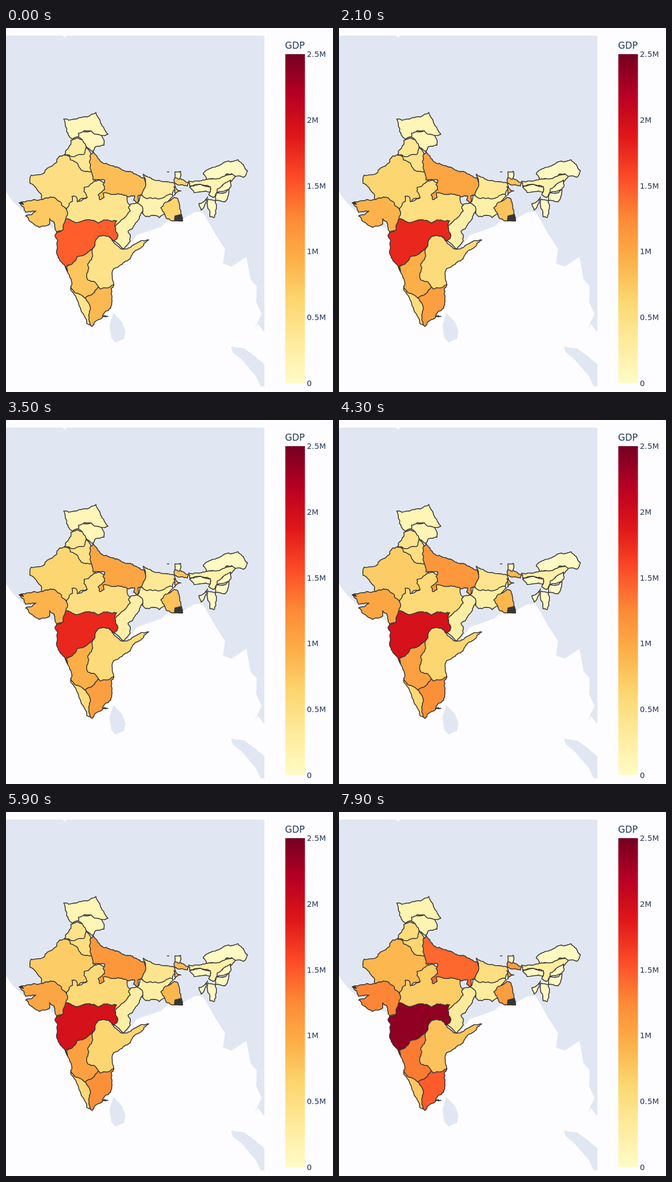
An HTML page for the animation above (8 s loop, 600 by 668 pixels).

```html
<!DOCTYPE html>
<html lang="en">
<head>
<meta charset="utf-8">
<title>GDP map</title>
<style>
html, body { margin: 0; width: 100%; height: 100%; overflow: hidden; background: #fdfcfe; }
svg { display: block; width: 600px; height: 668px; }
text { font-family: "DejaVu Sans", Verdana, sans-serif; fill: #24375a; font-size: 14.3px; }
.title { font-size: 16.8px; }
#land { fill: #e0e7f2; }
#map { stroke: #3a3535; stroke-width: 1.6; stroke-linejoin: round; }
</style>
</head>
<body>
<svg viewBox="0 0 600 668">
  <defs><linearGradient id="scale" x1="0" y1="1" x2="0" y2="0"></linearGradient></defs>
  <g id="land"></g>
  <g id="map"></g>
  <rect x="512.5" y="48" width="36" height="603.5" fill="url(#scale)"/>
  <text class="title" x="512" y="38">GDP</text>
  <g id="ticks"></g>
</svg>
<script>
const LOOP = 8000, FIRST_HOLD = 100, HOLD = 1950, MAX = 2500;
const STOPS = ["#fffbc6", "#feeb9c", "#fcd670", "#fcb048", "#fc8a36", "#fd4b27", "#e01719", "#b80022", "#740022"];

const LAND = [
  "0,14 104,14 109,18 111,14 474,14 474,558 462,543 456,552 469,525 459,503 460,474 449,462 441,420 414,438 398,432 402,406 384,378 366,346 360,337 346,338 324,350 294,356 286,364 240,380 190,450 157,530 95,372 40,345 14,320 0,301",
  "197,523 213,540 219,556 217,570 201,577 193,568 190,545",
  "413,585 437,588 456,602 474,617 474,658 467,657 458,638 432,608 416,595"
];

// First-year value in thousands and key outline points. Painted in order:
// a later region covers the loose edge of an earlier one.
const REGIONS = {
  rajasthan: [500, "107,233 98,235 85,253 70,266 46,270 44,285 55,293 64,304 65,318 120,335 150,310 165,284 156,250 125,236"],
  gujarat: [735, "25,321 45,317 65,315 82,310 98,318 111,333 118,345 112,365 93,375 88,356 80,350 80,360 61,366 44,355 36,345 55,336 36,338"],
  karnataka: [770, "109,439 113,448 119,474 130,495 150,500 165,485 173,476 165,440 160,405 130,415"],
  kerala: [420, "119,474 126,490 137,515 148,542 155,545 160,530 155,500 144,495 129,487"],
  madhya: [400, "143,293 158,285 170,279 195,295 225,300 222,314 235,330 220,355 200,365 120,360 110,350 113,341 111,333 116,322 122,318 121,309 129,310 131,319 149,311 143,300"],
  tamil: [870, "144,495 159,488 164,481 185,470 198,471 193,488 192,514 177,529 187,529 170,535 158,548 154,543 153,520 154,510"],
  jharkhand: [175, "241,321 246,307 265,305 300,300 307,308 295,330 295,340 281,348 256,346 250,340 251,336 248,326"],
  chhattisgarh: [178, "229,323 241,321 248,326 251,336 245,346 232,368 224,373 228,391 216,406 203,394 195,380 198,365 210,354 222,343 228,336 225,330"],
  maharashtra: [1470, "110,350 128,357 143,353 170,358 186,352 203,354 201,370 204,386 197,392 190,383 170,383 163,400 150,411 130,420 128,426 109,439 99,427 90,380 93,375 105,370"],
  andhra: [440, "163,400 170,383 188,382 197,392 205,400 216,406 232,399 262,389 247,404 230,418 213,434 198,441 195,455 198,471 173,479 163,466 151,463 148,455 152,440 150,433 157,425"],
  haryana: [350, "116,235 118,242 131,248 138,261 156,264 162,250 153,226 147,218 135,228"],
  uttar: [830, "155,232 160,227 171,241 189,251 211,259 243,271 253,275 260,290 249,306 242,308 241,321 234,316 236,308 212,305 186,303 178,303 180,311 172,315 169,306 181,296 178,287 181,279 160,279 156,262 153,245"],
  bihar: [285, "252,268 270,278 290,282 309,285 311,292 305,305 290,311 256,312 249,306 253,296 256,281"],
  bengal: [630, "308,311 315,313 319,332 324,354 309,354 293,347 291,341 284,330 301,317", "308,291 321,299 309,307", "310,275 326,279 335,284 333,290 309,284"],
  sikkim: [12, "310,264 320,263 320,273 317,278 310,275"],
  punjab: [300, "129,202 145,205 147,218 143,232 126,236 107,233 115,220 119,206"],
  himachal: [83, "133,200 136,188 165,188 175,197 180,215 164,218 160,227 147,218"],
  kashmir: [87, "106,167 124,167 143,163 165,155 169,164 178,181 187,195 175,197 157,189 144,188 133,193 133,200 122,204 111,190"],
  assam: [160, "335,281 365,279 395,270 423,266 418,276 397,288 386,303 380,311 372,306 376,295 337,290"],
  arunachal: [15, "362,268 375,258 398,248 408,244 426,242 443,262 436,274 423,272 404,268 386,277 368,278"],
  meghalaya: [22, "337,292 365,290 375,291 374,301 345,302"],
  nagaland: [14, "388,295 412,279 409,296 387,303"],
  manipur: [14, "386,303 409,296 402,319 384,317"],
  tripura: [22, "354,322 370,310 366,322 358,334"],
  mizoram: [8, "370,314 384,317 386,330 382,348 374,346"],
  goa: [38, "109,439 112,440 113,448"]
};

// Dark clusters of tiny islands: river delta, western tip, northern speck.
const ISLETS = ["310,345 322,342 324,354 309,354", "24,321 29,319 32,324", "296,264 299,264"];

const $ = id => document.getElementById(id);

function add(parent, tag, attrs, text = "") {
  const node = document.createElementNS("http://www.w3.org/2000/svg", tag);
  for (const key in attrs) node.setAttribute(key, attrs[key]);
  node.textContent = text;
  return parent.appendChild(node);
}

// Seeded by position, from -0.5 to 0.5.
function noise(x, y) {
  const n = Math.sin(x * 12.99 + y * 78.23) * 43758.5;
  return n - Math.floor(n) - 0.5;
}

// Splits an edge by midpoint displacement into a jagged border.
function roughEdge([x1, y1], [x2, y2]) {
  const dx = x2 - x1, dy = y2 - y1;
  if (Math.hypot(dx, dy) < 4) return [[x1, y1]];
  const x = (x1 + x2) / 2, y = (y1 + y2) / 2, shift = noise(x, y) * 0.3;
  const mid = [x - dy * shift, y + dx * shift];
  return [...roughEdge([x1, y1], mid), ...roughEdge(mid, [x2, y2])];
}

function roughPath(outline) {
  const points = outline.split(" ").map(p => p.split(",").map(Number));
  const border = points.flatMap((p, i) => roughEdge(p, points[(i + 1) % points.length]));
  return "M" + border.map(p => p.map(v => v.toFixed(1)).join()).join("L") + "Z";
}

function colour(value) {
  const pos = Math.min(value / MAX, 1) * (STOPS.length - 1);
  const low = Math.min(Math.floor(pos), STOPS.length - 2);
  const channel = (stop, i) => parseInt(STOPS[stop].slice(i, i + 2), 16);
  const mix = i => Math.round(channel(low, i) + (channel(low + 1, i) - channel(low, i)) * (pos - low));
  return `rgb(${[1, 3, 5].map(mix)})`;
}

// Larger economies grow a little more slowly.
const valueAt = (base, year) => base * (1.13 - base / 50000) ** year;

LAND.forEach(points => add($("land"), "polygon", { points }));
const shapes = Object.values(REGIONS).map(([base, ...outlines]) => ({
  base, node: add($("map"), "path", { d: outlines.map(roughPath).join("") })
}));
ISLETS.forEach(points => add($("map"), "polygon", { points, fill: "#3a3535" }));
STOPS.forEach((hex, i) => add($("scale"), "stop", { offset: i / (STOPS.length - 1), "stop-color": hex }));
["0", "0.5M", "1M", "1.5M", "2M", "2.5M"].forEach((label, i) =>
  add($("ticks"), "text", { x: 552, y: 656.7 - i * 120.7 }, label));

let shown = -1;
function render(time) {
  const t = time % LOOP;
  const year = t < FIRST_HOLD ? 0 : 1 + Math.floor((t - FIRST_HOLD) / HOLD);
  if (year === shown) return;
  shown = year;
  shapes.forEach(({ base, node }) => node.setAttribute("fill", colour(valueAt(base, year))));
}

render(0);
let start;
function tick(now) {
  start ??= now;
  render(now - start);
  requestAnimationFrame(tick);
}
requestAnimationFrame(tick);
</script>
</body>
</html>
```
